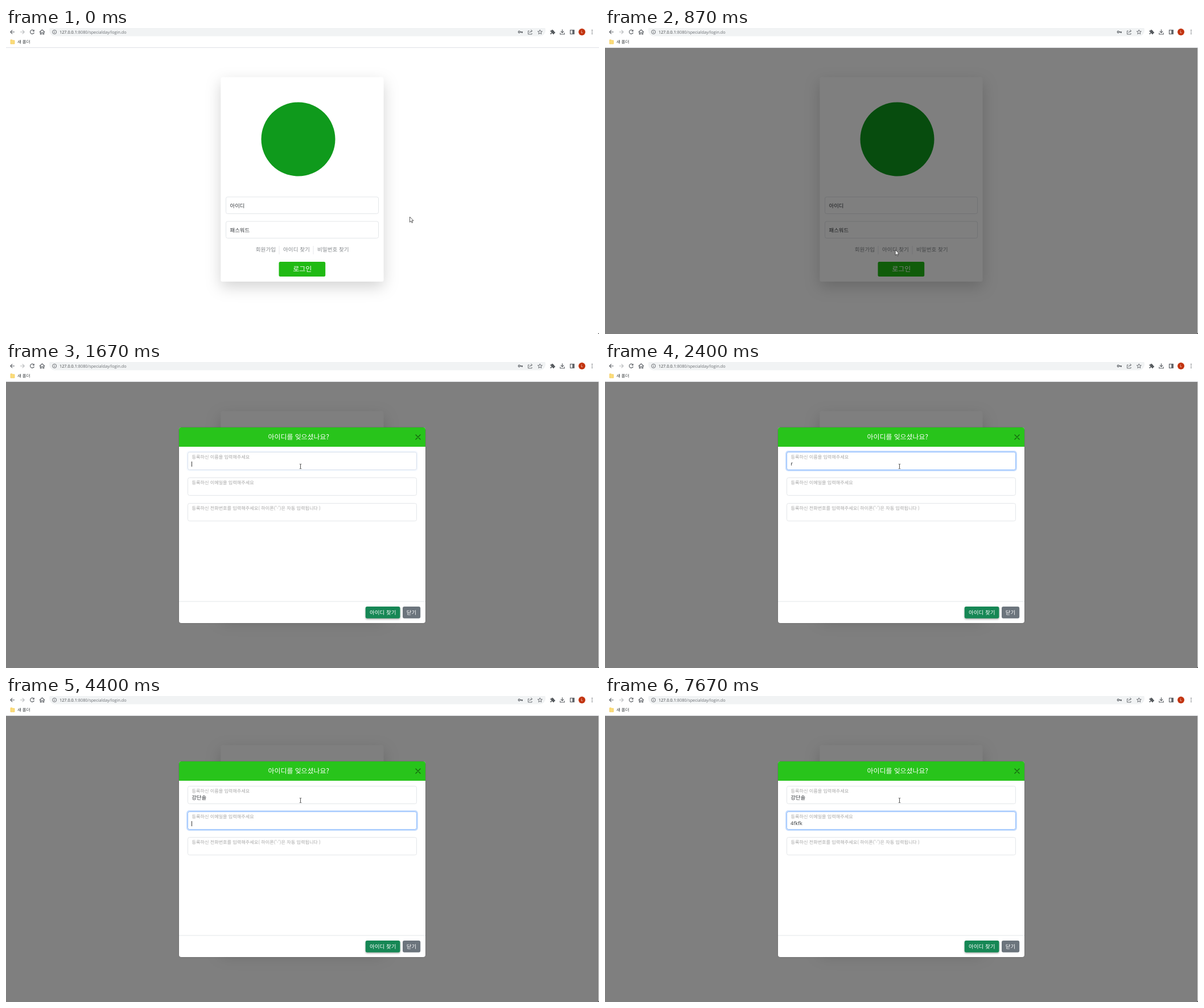
An HTML page for the animation above (8000 ms loop, 1042 by 538 pixels).

```html
<!DOCTYPE html>
<html lang="ko">
<head>
<meta charset="utf-8">
<title>Login</title>
<style>
  html, body { margin: 0; width: 100%; height: 100%; overflow: hidden; background: #fff; }
  svg { display: block; width: 1042px; height: 538px; }
  text { font-family: "Noto Sans CJK KR", "Noto Sans CJK", "Malgun Gothic", sans-serif; text-rendering: geometricPrecision; white-space: pre; }
  .latin { font-family: "Open Sans", "Noto Sans", sans-serif; }
  .icon { fill: none; stroke: #5f6368; stroke-width: 1.2; }
  .box { fill: #fff; stroke: #e3e6e9; }
  .link { font-size: 9.6px; fill: #84888c; }
  .label { font-size: 8.15px; fill: #a6a6a6; }
  .value { font-size: 9.4px; fill: #33373b; }
  .mid { text-anchor: middle; fill: #fff; }
</style>
</head>
<body>
<svg viewBox="0 0 1042 538">
  <defs>
    <filter id="soft" x="-30%" y="-30%" width="160%" height="160%">
      <feDropShadow dx="0" dy="9" stdDeviation="13.5" flood-color="#000" flood-opacity=".175"/>
    </filter>
    <filter id="lift" x="-20%" y="-30%" width="140%" height="180%">
      <feDropShadow dx="0" dy="1.5" stdDeviation="1.6" flood-color="#000" flood-opacity=".35"/>
    </filter>
  </defs>
  <rect width="1042" height="538" fill="#fff"/>

  <g id="login">
    <rect x="377.7" y="86.7" width="285.5" height="359" rx="3" fill="#fff" filter="url(#soft)"/>
    <circle cx="513.5" cy="195.5" r="65" fill="#0f9a1c"/>
    <rect class="box" x="386.5" y="297" width="268" height="29.5" rx="3"/>
    <rect class="box" x="386.5" y="340" width="268" height="29.5" rx="3"/>
    <text class="value" x="393.5" y="316.2">아이디</text>
    <text class="value" x="393.5" y="359.2">패스워드</text>
    <path d="M480 383V398M540 383V398" stroke="#e6e8eb"/>
    <text class="link" x="438.8" y="392.8">회원가입</text>
    <text class="link" x="487" y="392.8">아이디 찾기</text>
    <text class="link" x="547" y="392.8">비밀번호 찾기</text>
    <rect x="479.5" y="411" width="81.7" height="26" rx="2.5" fill="#20ba14"/>
    <text class="mid" x="520.8" y="428" font-size="12">로그인</text>
  </g>

  <g id="bar">
    <rect width="1042" height="35" fill="#fff"/>
    <rect x="76" y="-6" width="872" height="20.5" rx="10" fill="#f1f3f4"/>
    <path d="M0 34.5H1042" stroke="#dfe1e5"/>
    <path class="icon" d="M15 7H8M11.2 3.6L7.8 7L11.2 10.4"/>
    <path class="icon" d="M25 7H32M28.8 3.6L32.2 7L28.8 10.4" style="stroke:#babcbe"/>
    <path class="icon" d="M48.6 4.4A3.5 3.5 0 1 0 49.4 8"/>
    <path d="M49.8 2.8V6.2H46.4Z" fill="#5f6368"/>
    <path class="icon" d="M59 7.2L63.5 3L68 7.2M60.4 6.4V11H62.2V8H64.8V11H66.6V6.4"/>
    <circle class="icon" cx="85.2" cy="7" r="3.5" style="stroke-width:.9"/>
    <path class="icon" d="M85.2 6.5V9M85.2 4.8V5.7" style="stroke-width:.9"/>
    <text class="latin" x="94" y="9.7" font-size="7.3" fill="#6b6f73"><tspan fill="#3c4043">127.0.0.1</tspan>:8080/specialday/login.do</text>
    <circle class="icon" cx="901.8" cy="7" r="1.6"/>
    <path class="icon" d="M903.5 7H908M906.7 7V9" style="stroke-width:1.7"/>
    <path class="icon" d="M919.5 5H917.5V11H924V9M919.8 8.8Q920.2 5.3 924.3 5.2M922.4 3L924.7 5.2L922.4 7.4" style="stroke-width:.9"/>
    <path id="star" class="icon" style="stroke-width:.9"/>
    <path d="M956.5 4.5H958.5A1.4 1.4 0 1 1 961.3 4.5H963V6.6A1.4 1.4 0 1 1 963 9.2V11H960.8A1.3 1.3 0 1 0 958.4 11H956.5V9A1.3 1.3 0 1 0 956.5 6.6Z" fill="#55595d"/>
    <path class="icon" d="M977.5 2.6V8M974.8 5.6L977.5 8.3L980.2 5.6M973.8 8.6V11H981.2V8.6"/>
    <rect class="icon" x="991.5" y="3.7" width="6.8" height="6.8"/>
    <path d="M995.2 3.5H998.5V10.5H995.2Z" fill="#5f6368"/>
    <circle cx="1012" cy="7" r="6" fill="#c2330f"/>
    <text class="latin mid" x="1012" y="9.4" font-size="6.6">L</text>
    <path d="M1029.9 3.9V10.2" stroke="#5f6368" stroke-width="1.7" stroke-linecap="round" stroke-dasharray="0 3.1"/>
    <path d="M8 20.8H11L12 21.8H15V28H8Z" fill="#fbdc7b" stroke="#f0c548" stroke-width=".6"/>
    <text x="20" y="26.5" font-size="7.4" fill="#3c4043">새 폴더</text>
  </g>

  <rect id="dim" y="35" width="1041.3" height="503" fill="#000" opacity=".5"/>
  <path d="M1042 536V538H1040Z" fill="#444"/>

  <g id="modal">
    <rect x="303.5" y="114.5" width="434" height="345" rx="4.5" fill="#000" opacity=".2"/>
    <rect x="304" y="115" width="433" height="344" rx="4" fill="#fff"/>
    <path d="M304 149V119A4 4 0 0 1 308 115H733A4 4 0 0 1 737 119V149Z" fill="#28c41b"/>
    <text class="mid" x="514.3" y="136.1" font-size="11.9">아이디를 잊으셨나요?</text>
    <path d="M720 128L728 136M728 128L720 136" stroke="#14620e" stroke-width="1.3" stroke-linecap="round"/>
    <g id="fields"></g>
    <path d="M304 421H737" stroke="#e3e6e9"/>
    <rect x="631.7" y="430" width="60.8" height="20.7" rx="3" fill="#198754" filter="url(#lift)"/>
    <text class="mid" x="662.2" y="443.8" font-size="9.55">아이디 찾기</text>
    <rect x="697" y="430" width="31.2" height="20.7" rx="3" fill="#6c757d"/>
    <text class="mid" x="712.5" y="443.8" font-size="9.4">닫기</text>
    <text id="name" class="value" x="326.2" y="182.2"></text>
    <text id="mail" class="value latin" x="326" y="227.3" style="font-size:9px"></text>
    <rect id="caret" width=".9" height="9" fill="#222"/>
  </g>

  <g id="pointer" stroke-linejoin="round">
    <path id="arrow" d="M0 0V9.4L2.2 7.4L3.7 10.6L5.1 10L3.7 6.8H6.6Z" fill="#fff" stroke="#333" stroke-width=".8"/>
    <path id="hand" d="M-.8 .7Q.1 -.5 1 .7V4.6Q2.1 3.8 2.8 4.9Q3.9 4.2 4.4 5.4Q5.5 5.1 5.5 6.4V9Q5.3 10.8 4.2 12.4H-.9Q-1.9 10.4 -4 7.8Q-3.9 6.1 -2.3 6.9L-.8 8.1ZM1 4.6V6.8M2.8 4.9V7M4.4 5.4V7.2" fill="#fff" stroke="#333" stroke-width=".8"/>
    <path id="beam" d="M-1.6 -4H-.5L0 -3.5L.5 -4H1.6M0 -3.5V3.5M-1.6 4H-.5L0 3.5L.5 4H1.6" fill="none" stroke="#222" stroke-width=".8"/>
  </g>
</svg>
<script>
const LOOP = 8000, TICK = 1000 / 15;
const $ = id => document.getElementById(id);
const clamp = v => Math.max(0, Math.min(1, v));
const ease = v => v * v * (3 - 2 * v);
const show = (id, on) => $(id).style.display = on ? "" : "none";
const inside = (p, x, y, w, h) => p.x >= x && p.x <= x + w && p.y >= y && p.y <= y + h;

const labels = [
  "등록하신 이름을 입력해주세요",
  "등록하신 이메일을 입력해주세요",
  "등록하신 전화번호를 입력해주세요( 하이폰('-')은 자동 입력됩니다 )"
];
const fieldY = i => 158.5 + 45 * i;
$("fields").innerHTML = labels.map((s, i) => `
  <rect class="box" x="319.5" y="${fieldY(i)}" width="402" height="31" rx="3"/>
  <g id="ring${i}" fill="none">
    <rect x="318.2" y="${fieldY(i) - 1.3}" width="404.6" height="33.6" rx="4" stroke="#c2dbfe" stroke-width="2.2"/>
    <rect x="319.5" y="${fieldY(i)}" width="402" height="31" rx="3" stroke="#94bffe"/>
  </g>
  <text class="label" x="326.5" y="${fieldY(i) + 11.8}">${s}</text>`).join("");

$("star").setAttribute("d", "M" + Array.from({ length: 10 }, (_, i) => {
  const a = i * Math.PI / 5, r = i % 2 ? 1.8 : 4.2;
  return `${(938.3 + r * Math.sin(a)).toFixed(2)} ${(7.3 - r * Math.cos(a)).toFixed(2)}`;
}).join("L") + "Z");

// [time, text] pairs; Hangul is composed letter by letter
const nameSteps = [[0, ""], [2400, "r"], [2470, ""], [2800, "ㄱ"], [2870, "가"], [2930, "강"],
  [3070, "강ㄷ"], [3130, "강다"], [3270, "강단"], [3330, "강단ㅅ"], [3730, "강단소"], [4070, "강단솔"]];
const mailSteps = [[0, ""], [5200, "4"], [6800, "4f"], [6870, "4fk"], [7070, "4fkf"], [7130, "4fkfk"]];
const textAt = (steps, t) => steps.filter(s => s[0] <= t).pop()[1];

// [from, to] spans in which the caret is lit
const nameCaret = [[1670, 2400], [2470, 2800]];
const mailCaret = [[4270, 4800], [5200, 5730], [6270, 7670]];
const lit = (spans, t) => spans.some(([a, b]) => t >= a && t < b);

function pointerAt(q) {
  if (q < 1000) {
    const k = ease(clamp((q - 67) / 666));
    return { x: 709.5 - 199.3 * k, y: 332 + 58.2 * k + 3 * Math.sin(Math.PI * k) };
  }
  const k = ease(clamp((q - 1000) / 533));
  return { x: 510.2 + 7.3 * k + 14 * Math.sin(Math.PI * k), y: 390.2 - 206.7 * k };
}

function shapeAt(p, t) {
  if (t >= 930) return [0, 1, 2].some(i => inside(p, 319, fieldY(i), 403, 31)) ? "beam" : "arrow";
  if (t >= 870) return "arrow";
  if (inside(p, 386, 297, 269, 30) || inside(p, 386, 340, 269, 30)) return "beam";
  const onLink = [[439, 35], [487, 47], [547, 56]].some(([x, w]) => inside(p, x, 382, w, 15));
  return onLink || inside(p, 480, 411, 81, 26) ? "hand" : "arrow";
}

function draw(t) {
  const q = Math.floor((t + 4) / TICK) * TICK;
  show("dim", t >= 870);
  show("modal", t >= 930);

  const focus = ease(clamp((q - 1600) / 266));
  const moved = ease(clamp((q - 4200) / 200));
  $("ring0").style.opacity = focus * (1 - moved);
  $("ring1").style.opacity = moved;
  $("ring2").style.opacity = 0;

  $("name").textContent = textAt(nameSteps, t);
  $("mail").textContent = textAt(mailSteps, t);
  const inMail = t >= 4270, field = $(inMail ? "mail" : "name");
  show("caret", lit(inMail ? mailCaret : nameCaret, t));
  const width = field.textContent ? field.getComputedTextLength() : 0;
  $("caret").setAttribute("x", 326 + width);
  $("caret").setAttribute("y", inMail ? 220 : 175);

  const p = pointerAt(q), shape = shapeAt(p, t);
  for (const id of ["arrow", "hand", "beam"]) show(id, id === shape);
  $("pointer").setAttribute("transform", `translate(${p.x.toFixed(2)} ${p.y.toFixed(2)})`);
}

const start = performance.now();
function loop() {
  draw((performance.now() - start) % LOOP);
  requestAnimationFrame(loop);
}
loop();
</script>
</body>
</html>
```
